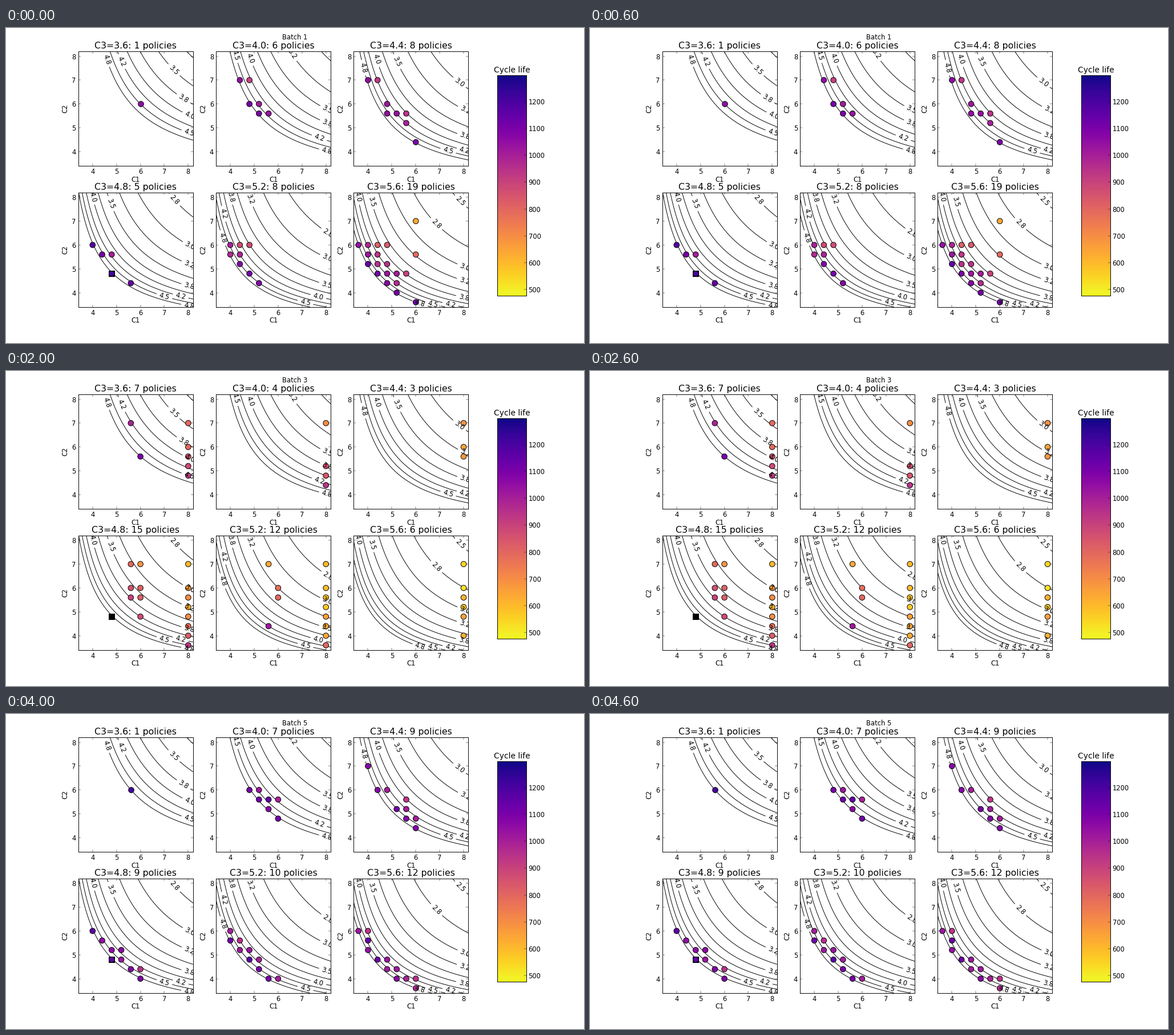
A matplotlib script for the animation above (5000 ms loop, 1013 by 553 pixels).

```python
import itertools

import numpy as np
import matplotlib.pyplot as plt
from matplotlib.animation import FuncAnimation

W, H, DPI = 1013, 553, 64
PT = 1.08                           # point scale for fonts, lines and pads
LOW, HIGH = 3.4, 8.2                # axis limits
LEFT, RIGHT, GUTTER = 0.125, 0.8, 0.2
TOPS = (41.2, 288.7)                # panel rows in pixels
SIDE = (RIGHT - LEFT) * W / (3 + 2 * GUTTER)
LEVELS = np.arange(2.5, 4.8, 0.25)
LIMIT = 4.81                        # fastest last step allowed
LIFE = dict(cmap="plasma_r", vmin=476.5, vmax=1297.5)

# Policies tested per batch for each C3
COUNTS = {
    3.6: (1, 0, 7, 3, 1),
    4.0: (6, 8, 4, 5, 7),
    4.4: (8, 12, 3, 5, 9),
    4.8: (5, 8, 15, 7, 9),
    5.2: (8, 9, 12, 14, 10),
    5.6: (19, 10, 6, 12, 12),
}

# How strongly a batch seeks long life and high C1
TASTES = ((0.3, -0.5), (1, 0), (0, 1), (0, 0), (1, 0))

plt.rcParams.update({
    "font.family": "DejaVu Sans",
    "font.size": 12 * PT,
    "axes.titlesize": 16.4 * PT,
    "axes.labelsize": 12 * PT,
    "axes.linewidth": PT,
    "axes.titlepad": 5 * PT,
    "axes.labelpad": 5 * PT,
})


def last_step(c1, c2, c3):
    """C4 that completes four equal charge steps in ten minutes."""
    rest = 1 / 6 - 0.2 / c1 - 0.2 / c2 - 0.2 / c3
    return 0.2 / np.maximum(rest, 0.02)


def expected_life(c1, c2, c3):
    return 1130 + 260 * (last_step(c1, c2, c3) - 4.6) - 45 * abs(c1 - c2)


def plan_batches(c3, rng):
    """Share the valid policies among four batches; the fifth repeats the best."""
    steps = [3.6 + 0.4 * i for i in range(7)]
    valid = [(c1, c2) for c1, c2 in itertools.product(steps + [8], steps + [7])
             if last_step(c1, c2, c3) <= LIMIT]
    pool, batches = list(valid), []
    for batch, (count, (life, speed)) in enumerate(zip(COUNTS[c3], TASTES)):
        source = valid if batch == 4 else pool
        score = {p: life * expected_life(*p, c3) / 100 + speed * p[0]
                 + rng.normal(0, 0.6) for p in source}
        chosen = sorted(source, key=score.get, reverse=True)[:count]
        pool = [p for p in pool if p not in chosen]
        batches.append(np.array(
            [(*p, expected_life(*p, c3) + rng.normal(0, 40)) for p in chosen]
        ).reshape(-1, 3))
    return batches


def style_ticks(ax, **kw):
    ax.tick_params(direction="in", length=4 * PT, width=0.5 * PT,
                   pad=4 * PT, labelsize=12 * PT, **kw)


def make_panel(c3, row, col):
    x = LEFT * W + col * (1 + GUTTER) * SIDE
    ax = fig.add_axes([x / W, 1 - (TOPS[row] + SIDE) / H, SIDE / W, SIDE / H])
    ax.set(xlim=(LOW, HIGH), ylim=(LOW, HIGH), xticks=range(4, 9), yticks=range(4, 9))
    ax.set_xlabel("C1", labelpad=0.5)
    ax.set_ylabel("C2")
    style_ticks(ax, top=True, right=True)

    grid = np.linspace(LOW, HIGH, 205)
    c1, c2 = np.meshgrid(grid, grid)
    lines = ax.contour(c1, c2, last_step(c1, c2, c3), LEVELS,
                       colors="black", linewidths=PT)
    ax.clabel(lines, fmt="%1.1f", fontsize=12 * PT)

    marks = dict(s=100 * PT**2, edgecolors="black", linewidths=PT, zorder=3)
    if c3 == 4.8:
        ax.scatter(4.8, 4.8, marker="s", color="black", s=100 * PT**2, lw=PT, zorder=3)
    return ax, ax.scatter([], [], c=[], **marks, **LIFE)


def make_scale():
    ax = fig.add_axes([0.85, 0.15, 0.05, 0.7])
    low, high = LIFE["vmin"], LIFE["vmax"]
    ax.imshow(np.linspace(low, high, 256)[:, None], aspect="auto", origin="lower",
              extent=(0, 1, low, high), **LIFE)
    ax.set(xticks=[], yticks=range(500, 1201, 100))
    ax.set_title("Cycle life", fontsize=14.4 * PT)
    style_ticks(ax, left=False, right=True, labelleft=False, labelright=True)


fig = plt.figure(figsize=(W / DPI, H / DPI), dpi=DPI, facecolor="white")
heading = fig.text(0.5, 1 - 20 / H, "", ha="center", va="baseline")
rng = np.random.default_rng(5)
panels = []
for i, c3 in enumerate(COUNTS):
    panels.append((c3, *make_panel(c3, *divmod(i, 3)), plan_batches(c3, rng)))
make_scale()


def show(batch):
    heading.set_text(f"Batch {batch + 1}")
    for c3, ax, dots, batches in panels:
        points = batches[batch]
        dots.set_offsets(points[:, :2])
        dots.set_array(points[:, 2])
        ax.set_title(f"C3={c3}: {len(points)} policies")
    return []


anim = FuncAnimation(fig, show, frames=5, interval=1000, init_func=lambda: show(0),
                     repeat=True, repeat_delay=0, blit=False)
plt.show()
```
